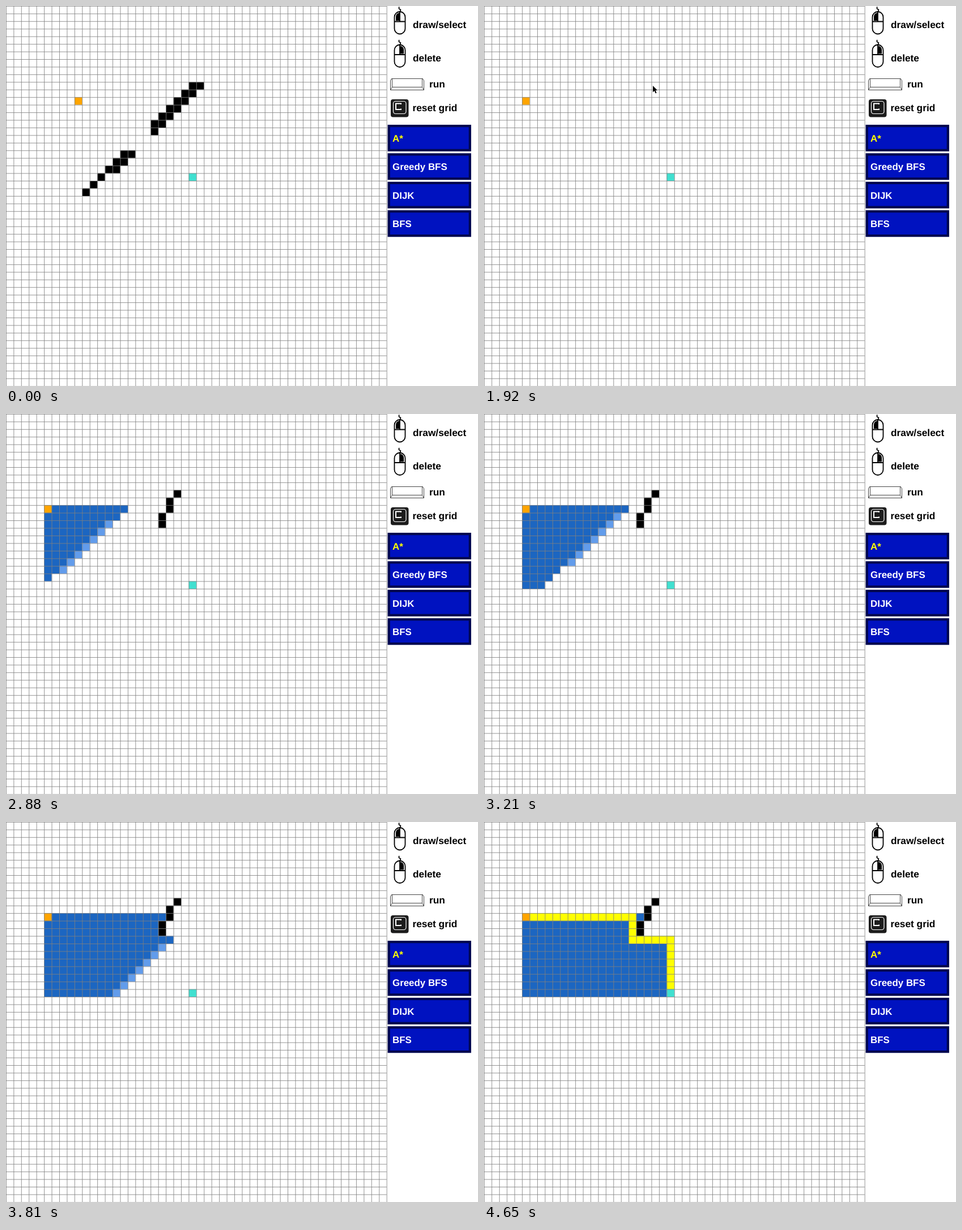
Animation, 833 px wide and 672 px high, one loop 4.86 s. Source, as an HTML page:

```html
<!DOCTYPE html>
<html lang="en">
<head>
<meta charset="utf-8">
<title>Path finding grid</title>
<style>
  html, body { margin: 0; width: 100%; height: 100%; overflow: hidden; background: #fff; }
  svg { display: block; }
  text { font: bold 17.3px "Liberation Sans", Arial, sans-serif; text-rendering: geometricPrecision; }
  .button rect { fill: #0012c0; stroke: #00064e; stroke-width: 4.2; }
  .button text { font-size: 16.9px; fill: #fff; }
  .button .active { fill: #ff0; }
</style>
</head>
<body>
<svg width="833" height="672" viewBox="0 0 833 672">
  <defs>
    <g id="mouse" fill="none" stroke="#000" stroke-width="1.8">
      <rect x="685.5" y="10" width="19" height="39.5" rx="9.5"/>
      <path d="M686 27.500H704M695 10V27"/>
      <path d="M695 10C700 4 691 8 694 1.500"/>
    </g>
    <path id="pressed" d="M688 26V19Q688 13 694.500 12V26Z"/>
  </defs>
  <g id="cells"></g>
  <path id="grid" fill="none" stroke="#808080" stroke-width="0.84"/>

  <use href="#mouse"/>
  <use href="#pressed"/>
  <use href="#mouse" y="58.500"/>
  <use href="#pressed" transform="matrix(-1 0 0 1 1390 58.500)"/>
  <g fill="none" stroke="#333" stroke-width="0.9">
    <path d="M680.500 128.500H735.500L737.500 132V148.500H678.500V132Z"/>
    <path d="M681.500 128.500V143.500H734.500V128.500M681.500 143.500L678.500 148.500M734.500 143.500L737.500 148.500"/>
  </g>
  <rect x="679" y="165" width="31.500" height="31.500" rx="4" fill="#1c1c1c"/>
  <rect x="683.500" y="168.500" width="22.500" height="22" rx="4" fill="none" stroke="#fff" stroke-width="1.200"/>
  <path d="M697 174V172.500H688V183H697V181.500" fill="none" stroke="#fff" stroke-width="2"/>
  <text x="718" y="39">draw/select</text>
  <text x="718" y="97.500">delete</text>
  <text x="747" y="144">run</text>
  <text x="717.500" y="186">reset grid</text>
  <g id="menu"></g>
  <path id="cursor" d="M0 0V11.500L2.700 9L4.700 13.500L6.600 12.700L4.700 8.300H8.200Z"
        stroke="#fff" paint-order="stroke"/>
</svg>
<script>
const NS = "http://www.w3.org/2000/svg";
const LOOP = 4860, STEP = 30, COUNT = 50;
const W = 16 * 833 / 992, H = 13.44;
const CLEAR = 630, PUT_START = 1470, PUT_GOAL = 1650, DRAW_WALL = 1950;
const $ = id => document.getElementById(id);

function add(parent, tag, attrs, text = "") {
  const el = document.createElementNS(NS, tag);
  for (const key in attrs) el.setAttribute(key, attrs[key]);
  el.textContent = text;
  return parent.appendChild(el);
}

let lines = "";
for (let i = 0; i <= COUNT; i++)
  lines += `M${i * W + 0.42} 0V672M0 ${i * H + 0.42}H${COUNT * W}`;
$("grid").setAttribute("d", lines);

["A*", "Greedy BFS", "DIJK", "BFS"].forEach((name, i) => {
  const g = add($("menu"), "g", { class: "button" });
  const y = 210 + i * 50.4;
  add(g, "rect", { x: 675.7, y: y + 2.1, width: 143.1, height: 42.9 });
  add(g, "text", { x: 682, y: y + 30, class: i ? "" : "active" }, name);
});

const colors = {
  wall: "#000", closed: "#1c66c1", fresh: "#629ceb", path: "#ff0",
  start: "#ffa500", goal: "#40e0d0"
};
const layers = {};
for (const key in colors) layers[key] = add($("cells"), "path", { fill: colors[key] });

// Cells with column + row = sum
const diagonal = (sum, top, bottom) =>
  Array.from({ length: bottom - top + 1 }, (_, i) => [sum - top - i, top + i]);

const oldWalls = [
  ...diagonal(34, 10, 15), ...diagonal(35, 10, 16),
  ...diagonal(34, 19, 24), ...diagonal(35, 19, 21)
];
const walls = Array.from({ length: 5 }, (_, i) => [22 - Math.ceil(i / 2), 10 + i]);
const oldStart = [9, 12], start = [5, 12], goal = [24, 22];

// Visited diagonal by diagonal, top down, left of the wall and up to the goal.
const open = ([c, r]) => {
  const wall = walls.find(w => w[1] === r);
  return c >= start[0] && c <= goal[0] && (!wall || c < wall[0]);
};
const visited = [];
for (let sum = start[0] + start[1]; sum < goal[0] + goal[1]; sum++)
  visited.push(...diagonal(sum, start[1], goal[1]).filter(open));

// The route is traced back from the goal around the wall.
const route = [];
let [c, r] = goal;
for (const [x, y] of [[24, 15], [19, 15], [19, 12], start])
  while (c !== x || r !== y) {
    c += Math.sign(x - c);
    r += Math.sign(y - r);
    route.push([c, r]);
  }
route.pop();

// time, x, y of the pointer tip
const moves = [
  [910, 668, -14], [1380, 30, 150], [PUT_START, 74, 168],
  [PUT_GOAL, 329, 300], [1920, 298, 141], [2130, 275, 194]
];

function pointer(t) {
  const i = moves.findIndex(m => m[0] > t);
  if (i < 1) return null;
  const [t0, x0, y0] = moves[i - 1], [t1, x1, y1] = moves[i];
  const u = (t - t0) / (t1 - t0), k = u * u * (3 - 2 * u);
  return [x0 + (x1 - x0) * k, y0 + (y1 - y0) * k];
}

function paint(key, list) {
  const box = ([c, r]) => `M${c * W} ${r * H}h${W}v${H}h${-W}z`;
  layers[key].setAttribute("d", list.map(box).join(""));
}

function draw(time) {
  const t = Math.floor(time % LOOP / STEP) * STEP;
  const early = t < CLEAR;
  const n = Math.max(0, Math.floor(64 + (t - 2880) * 0.0977));
  const old = Math.max(0, n - 7);
  const drawn = Math.max(0, Math.ceil((t - DRAW_WALL + 1) / 37.5));

  paint("wall", early ? oldWalls : walls.slice(0, drawn));
  paint("closed", visited.slice(0, old));
  paint("fresh", visited.slice(old, n));
  paint("path", route.slice(0, Math.max(0, n - visited.length)));
  paint("start", early ? [oldStart] : t >= PUT_START ? [start] : []);
  paint("goal", early || t >= PUT_GOAL ? [goal] : []);

  const tip = pointer(t);
  $("cursor").setAttribute("visibility", tip ? "visible" : "hidden");
  if (tip) $("cursor").setAttribute("transform", `translate(${tip})`);
}

let origin;
function tick(now) {
  origin ??= now;
  draw(now - origin);
  requestAnimationFrame(tick);
}
draw(0);
requestAnimationFrame(tick);
</script>
</body>
</html>
```
